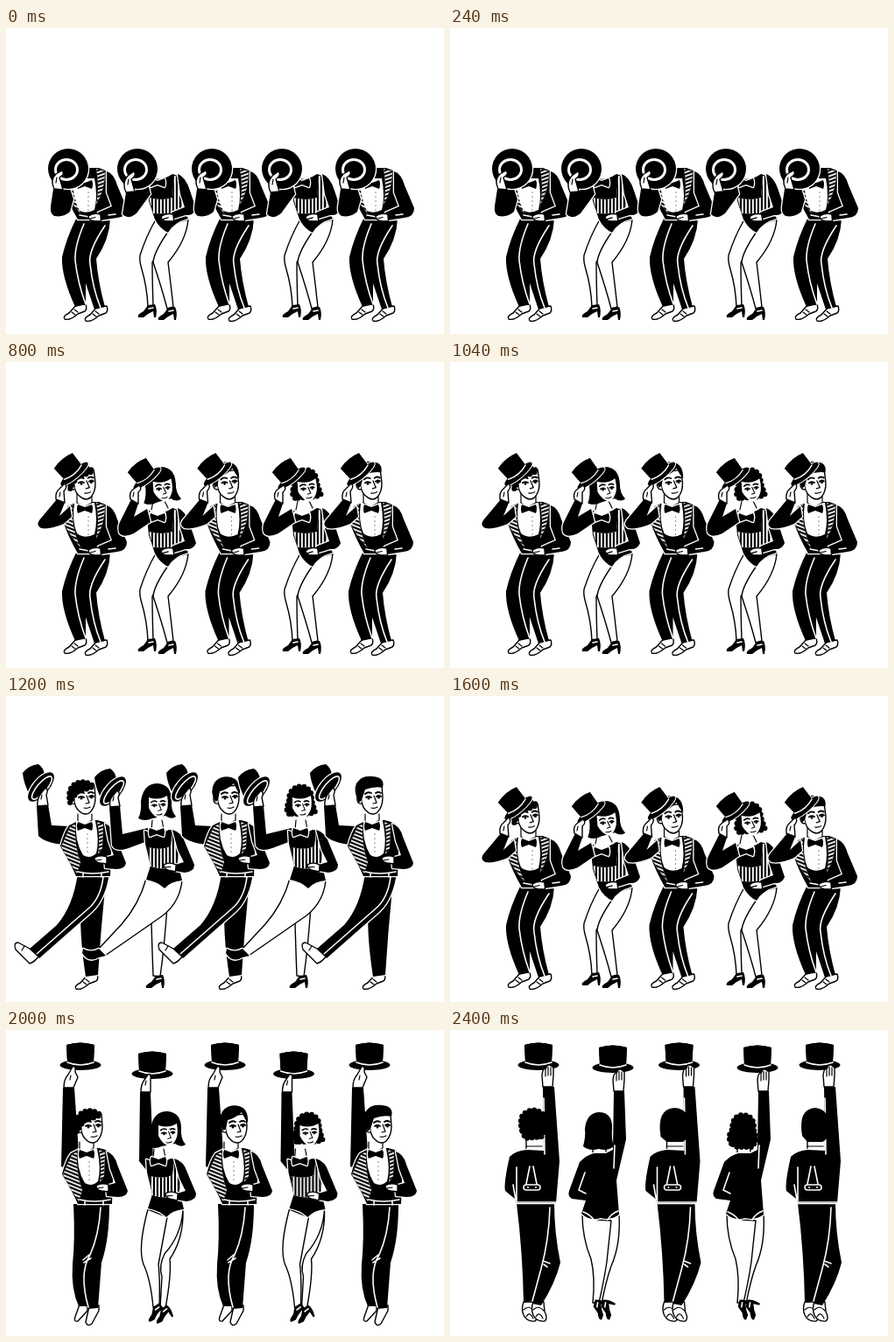
Write an HTML page that moves like this. It is 500 by 350 pixels and loops after 2800 ms.

```html
<!DOCTYPE html>
<html lang="en">
<head>
<meta charset="utf-8">
<title>Chorus line</title>
<style>
html, body { margin: 0; width: 100%; height: 100%; overflow: hidden; background: #fff; }
svg { display: block; width: 100vw; height: 100vh; }
.ink { fill: #000; stroke: #fff; stroke-width: 2.6; paint-order: stroke; stroke-linejoin: round; }
.skin { fill: #fff; stroke: #000; stroke-width: 1.4; stroke-linejoin: round; }
.chalk { fill: none; stroke: #fff; stroke-width: 1.6; stroke-linecap: round; }
.pen { fill: none; stroke: #000; stroke-width: 1.2; stroke-linecap: round; }
.brow { fill: none; stroke: #000; stroke-width: 1.9; stroke-linecap: round; }
.curls { fill: #000; stroke: #000; stroke-width: 6; stroke-linecap: round; stroke-dasharray: 0 5.5; }
</style>
</head>
<body>
<svg id="stage" viewBox="0 0 500 350"></svg>
<script>
const path = cls => d => `<path class="${cls}" d="${d}"/>`;
const [ink, skin, chalk, pen, brow, curls] = ["ink", "skin", "chalk", "pen", "brow", "curls"].map(path);
const fill = (d, paint = "#000") => `<path d="${d}" fill="${paint}"/>`;
const at = (x, y, art, turn = 0, size = 1) =>
  `<g transform="translate(${x} ${y}) rotate(${turn}) scale(${size})">${art}</g>`;
const striped = (d, kind) => fill(d, "#fff") + fill(d, `url(#${kind})`);
const stripes = (id, turn) =>
  `<pattern id="${id}" width="3.8" height="4" patternUnits="userSpaceOnUse" patternTransform="rotate(${turn})"><rect width="4" height="2.2"/></pattern>`;
const ellipse = (cls, x, y, rx, ry, turn = 0) =>
  `<ellipse class="${cls}" rx="${rx}" ry="${ry}" transform="translate(${x} ${y}) rotate(${turn})"/>`;
const buttons = (x, top, bottom) => `<path class="pen" d="M${x} ${top}V${bottom}" stroke-dasharray="0 5"/>`;

// Small parts, each drawn around its own anchor.
const bow = (x, y) => at(x, y, ink("M0-2L-8-5Q-10 0-8 5L0 2 8 5Q10 0 8-5Z"));
const hand = (x, y, turn = 0) => at(x, y, skin("M0-2Q-8-5-14-1Q-14 4-8 5L0 6Z") + pen("M-12 2L-6 1"), turn);
const crown = "M-16-23Q0-28 16-23L15-3Q0 2-15-3Z";
const hat = (x, y, turn, size) => at(x, y,
  ink(crown) + ellipse("ink", 0, 0, 23.5, 6) + fill(crown) + chalk("M-15-3Q0 3 15-3"), turn, size);
const openHat = (x, y) => at(x, y,
  ink("M-21-16Q-14-25-3-26Q3-22 4-14L-13 9Q-20-4-21-16Z") +
  ellipse("ink", 0, 0, 20.5, 9, -50) + ellipse("chalk", 1, 1, 16.5, 5.5, -50));
const hatTop = (x, y) =>
  ellipse("ink", x, y, 23, 23) +
  `<ellipse cx="${x - 2}" cy="${y + 1}" rx="12.5" ry="11.5" fill="none" stroke="#fff" stroke-width="3"/>`;
const shoe = (x, y, turn) => at(x, y, skin("M-5-1L6-2Q8 3 5 6L-3 9Q-12 17-18 15Q-21 12-13 8Z") + pen("M-10 7L-6 10M-7 4L-3 7"), turn);
const heel = (x, y, turn) => at(x, y, fill("M-4-1L4-2Q7 4 5 13L3 13 2 6Q-5 9-9 13L-15 13Q-17 10-9 6Z") + chalk("M-3 3L2 2"), turn);

const features =
  brow("M-7-5Q-4-8 0-6M5-6Q8-8 11-6M-6-1Q-3-3 0-1M6-2Q9-4 11-2") + pen("M3-3L6 5 2 6M0 11Q4 12 7 10") +
  `<circle cx="-3" r="1.5"/><circle cx="8.5" cy="-1" r="1.5"/>`;
const manFace = skin("M-12-13Q-13 8-6 14Q1 21 7 16Q13 10 13-1L12-15Z") + skin("M-12-1Q-17-4-16 2Q-15 7-11 6");
const manHair = {
  curly: curls("M-16 5Q-19-9-12-15Q-2-23 11-14Q5-10-7-9L-12-1Z"),
  part: fill("M-14 4Q-21-8-15-18Q-8-27 4-24Q15-21 14-5Q10-10 7-17Q-2-9-9-8L-11 2Z"),
  quiff: fill("M-14 5Q-21-8-17-17Q-11-27 2-25Q16-24 13-12Q4-14-7-10L-11 2Z")
};
const womanHair = {
  bob: fill("M-21 18Q-17 10-18-2Q-15-22 1-22Q17-21 17-2Q16 9 22 16Q17 20 10 15L-5 18Q-14 22-21 18Z"),
  wavy: curls("M-13 13Q-18 8-13-1Q-14-17 1-19Q14-17 13-3L17 11 10 13Z")
};
const womanFace = fill("M-9-6Q2-2 12-8Q14 4 11 10Q7 18 3 18Q-5 15-9 6Z", "#fff") + at(0, 4, features, 0, 0.88);
const head = (hair, x, y, turn) => at(x, y, manHair[hair]
  ? manFace + features + manHair[hair]
  : womanHair[hair] + womanFace, turn);

// Upper bodies
const manUpright =
  ink("M72 142L84 136H104Q117 138 121 146L119 200H80Q74 186 62 166Q66 150 72 142Z") +
  fill("M82 130L98 130 102 137Q107 160 103 174Q96 181 88 176Q78 160 80 137Z", "#fff") +
  striped("M73 144L79 140Q78 166 85 184L81 197Q71 183 63 166Z", "lapelLeft") +
  striped("M104 138L111 141 110 168 105 175Q108 156 104 138Z", "lapelRight") +
  pen("M82 129V137L90 142 98 136V129") + bow(90, 143) + buttons(93, 152, 174) +
  ink("M113 140Q122 143 125 155L137 185Q136 192 126 192L113 191 112 179 123 176 117 160Z") +
  chalk("M82 195Q98 199 117 195M88 196V201M109 196V201") + hand(115, 180);

const manCrouch = drop =>
  ink("M70 165L82 160H106L121 166 120 219H82Q71 200 65 182Z") +
  at(0, drop, fill("M78 161H101Q105 182 101 197Q90 203 81 196Q75 182 78 161Z", "#fff")) +
  striped("M69 167L76 163Q74 190 85 212Q72 198 65 182Z", "lapelLeft") +
  striped("M103 161L113 164Q113 185 103 202Q107 182 103 161Z", "lapelRight") +
  at(2, drop, bow(88, 168) + buttons(92, 177, 198)) +
  ink("M115 164Q123 166 127 180L138 206Q138 216 127 217L108 220 105 211 121 204 115 188Z") +
  chalk("M84 214L100 217M117 214L125 213") + hand(108, 215, -5);

const womanTop =
  ink("M158 150Q172 156 186 149L194 150Q199 165 196 186L201 207Q188 208 181 216Q172 208 160 206L165 190 159 165Z") +
  striped("M162 169Q178 173 188 168L190 151 194 151Q199 167 195 192Q180 196 165 191Z", "corset") +
  fill("M167 136H178L180 149 173 154 165 149Z", "#fff") + pen("M167 138L166 149M178 138L180 148") + bow(172, 152) +
  ink("M190 149Q201 152 205 165L215 189Q215 197 204 198L192 196 193 189 203 186 196 172Z") +
  hand(194, 191, 5);

const womanCrouch =
  ink("M160 168Q174 178 190 167L199 170 201 205 208 218Q192 222 185 234Q176 230 170 219L163 198Z") +
  striped("M163 194Q178 198 190 194L192 169 199 170 201 211Q185 213 168 212Z", "corset") +
  bow(173, 177) +
  ink("M196 167Q205 170 210 186L217 207Q214 215 205 214L192 218 189 211 204 205 199 190Z") +
  hand(191, 215, -8);

// Lower bodies
const manBentLegs =
  shoe(85, 318) + shoe(109, 320) +
  fill("M81 216L119 218Q118 242 103 264Q105 290 113 319L101 322 91 292 91 316 79 319Q63 284 64 262Q69 240 81 216Z") +
  chalk("M89 224Q78 250 79 266Q82 292 91 316M113 226Q93 256 96 270Q99 298 108 320");
const womanBentLegs =
  skin("M171 219Q160 238 153 260Q152 266 155 276Q161 296 162 319L168 318Q167 290 167 268Q184 246 184 234Z") +
  skin("M185 233Q169 256 168 268Q178 298 184 321L191 319Q188 292 185 268Q206 243 208 219Q192 222 185 234Z") +
  heel(166, 318) + heel(189, 321);

const manKickLegs = low => low
  ? shoe(98, 320) + ink("M86 235L113 220Q108 270 105 319L91 321Q83 270 86 235Z") +
    ink("M82 202H118Q114 232 98 247L38 300 27 289 58 262Q77 240 82 202Z") +
    chalk("M111 207Q108 232 93 244L35 295") +
    skin("M27 289L14 282Q8 282 11 290L27 306Q33 304 37 298Z") + pen("M21 286L18 291")
  : shoe(107, 322) + ink("M86 235L117 215Q112 270 113 321L99 323Q91 280 86 235Z") +
    ink("M79 197H118Q117 225 96 246L30 300 20 287 53 252Q74 232 79 197Z") +
    chalk("M102 204Q98 232 78 250L28 291M112 204Q107 265 109 320") +
    skin("M20 287L10 277Q4 279 8 288L18 303Q24 303 29 298Z") + pen("M15 283L11 287");

const womanKickLegs = low => low
  ? skin("M165 214Q166 270 168 320L176 321Q181 285 184 240L186 212Z") + heel(175, 321) +
    skin("M160 209Q152 238 132 261L106 289 113 297Q145 275 172 256Q198 240 201 211Q188 212 181 220Q172 212 160 209Z") +
    ink("M106 289L114 297 106 299Q94 306 87 294L88 289Q97 294 106 289Z")
  : skin("M178 214Q177 265 184 322L192 322Q193 280 201 207Z") + heel(191, 322) +
    skin("M160 205Q150 235 125 258L98 285 105 293Q138 268 165 250Q180 236 181 215Q172 208 160 205Z") +
    ink("M98 284L106 293 98 296Q88 301 81 290L82 286Q92 290 98 284Z");

const manCrossedLegs =
  skin("M84 314L79 328Q77 334 82 333L93 321V314Z") + skin("M95 316L91 334Q93 340 98 336L106 321V315Z") +
  fill("M77 199H118Q118 240 109 266L105 318 94 319 92 316 83 316Q74 296 76 268Q79 240 77 199Z") +
  chalk("M108 203Q106 235 96 257Q83 278 94 317M95 257L88 263M97 261L89 266");
const womanCrossedLegs =
  skin("M162 205Q150 250 157 268Q165 285 168 317L175 317Q176 285 174 268L184 214Z") +
  skin("M202 206Q200 235 181 256Q174 270 178 282L176 318 182 318Q189 280 187 262Q203 238 202 206Z") +
  heel(172, 316, -25) + heel(181, 318, -25);

// Poses: each returns one dancer at the left end of the line.
const bowMan = () => manBentLegs + manCrouch(11) +
  ink("M54 184L65 185 68 168 77 196 73 210Q66 217 55 215Q50 212 51 204Z") + hatTop(71, 161) +
  skin("M55 184Q50 174 57 167L64 163Q68 167 61 171L65 185Z") + pen("M58 171L57 177");
const bowWoman = () => womanBentLegs + womanCrouch +
  ink("M137 188L147 187 160 170 165 190 149 212Q139 220 133 213Z") + hatTop(150, 161) +
  skin("M137 188Q132 177 139 169L146 164Q150 168 143 173L147 187Z") + pen("M140 173L139 179");

const tipMan = hair => manBentLegs + manCrouch(0) +
  fill("M81 152H98V163L90 169 80 164Z", "#fff") + pen("M81 150V161L89 166 98 161V150") + bow(90, 168) +
  ink("M58 157L67 161 61 176 73 165 75 177 66 185Q50 192 40 190Q34 187 38 181Z") +
  head(hair, 89, 139, -3) + hat(78, 128, -40, 0.85) +
  skin("M57 157Q56 149 61 145L67 139Q71 142 66 148L67 161Z") + pen("M62 149L61 154");
const tipWoman = hair => womanBentLegs + womanCrouch +
  fill("M168 158H181L185 168 174 177 166 170Z", "#fff") + pen("M168 159L166 169M181 159L185 167") + bow(173, 178) +
  ink("M143 157L151 162 146 177 161 168 165 183 146 196Q133 202 129 195Q127 188 131 181Z") +
  head(hair, 177, 142, -4) + hat(161, 133, -38, 0.82) +
  skin("M142 157Q140 149 146 145L152 141Q156 145 151 149L151 162Z") + pen("M146 149L145 154");

const kickMan = low => hair => manKickLegs(low) + at(0, low ? 6 : 0,
  ink("M35 120L48 118 52 142 73 143 66 164Q45 162 37 154Z") + manUpright + head(hair, 89, 111) +
  openHat(40, 98) + skin("M36 120Q35 111 41 104L45 99Q49 101 46 107L48 119Z") + pen("M41 107L40 112"));
const kickWoman = low => hair => womanKickLegs(low) + at(0, low ? 4 : 0,
  ink("M118 123L130 121 133 154 162 147 164 161 140 170Q125 175 121 167Z") + womanTop + head(hair, 172, 118) +
  openHat(122, 105) + skin("M119 123Q117 114 123 109L127 104Q131 107 128 112L130 122Z") + pen("M123 111L122 116"));

const reachMan = hair => manCrossedLegs +
  ink("M65 66L78 66 83 140 77 162 63 156Z") + at(2, -1, manUpright) + head(hair, 97, 111) +
  hat(85, 40) + skin("M66 66Q66 56 71 51L76 42Q80 40 79 48L82 54 77 66Z") + pen("M74 52L73 57");
const reachWoman = hair => womanCrossedLegs +
  ink("M153 71L165 71 168 148 160 160 152 150Z") + at(2, -2, womanTop) + head(hair, 183, 115) +
  hat(167, 50) + skin("M154 71Q154 62 158 57L162 51Q166 49 165 57L165 71Z") + pen("M160 58L159 63");

const raisedPalm = (x, y) => at(x, y,
  skin("M-6 0L-7-13Q-6-22-3-20L-1-25 2-25 6-22 6-13 5 0Z") + pen("M-3-19V-12M0-23V-13M3-22V-13"));
const backShoe = x => at(x, 311,
  skin("M-6 0Q-9 8-6 15Q-2 23 7 22Q11 19 7 11L6 0Z") + pen("M-6 9Q0 3 6 10M-3 17Q1 10 5 19"));
const backHair = {
  curly: curls("M82 115Q78 98 87 94Q97 88 106 96Q112 107 105 122L86 124Z"),
  part: fill("M80 122Q75 90 96 89Q117 90 111 121Q108 127 105 128H87Z"),
  quiff: fill("M81 121Q76 90 96 89Q116 91 111 121Q107 127 104 128H87Z"),
  bob: fill("M152 133Q155 122 154 113Q156 94 171 94Q186 95 185 113Q184 124 187 133Q180 139 170 136Q159 139 152 133Z"),
  wavy: curls("M156 130Q151 122 157 114Q157 97 170 97Q183 98 182 114L185 126 180 134H163Z")
};
const backMan = hair => backShoe(90) + backShoe(101) +
  fill("M76 198H119Q119 232 126 266Q120 290 104 315L94 313 93 310 84 312Q83 255 76 198Z") +
  chalk("M114 203Q113 240 104 273L94 310M106 264L114 267M107 268L111 271") +
  skin("M87 124V138H107V124Z") + pen("M87 133H107") +
  ink("M106 65L119 65 125 150 121 198H76L74 193 63 184Q61 176 68 145Q75 138 87 137L107 138Z") +
  chalk("M107 78L108 142M72 177L75 194M76 157V197M76 197H121M91 156L87 176M95 156L99 176") +
  `<rect x="84" y="177" width="19" height="6" rx="3" fill="#000" stroke="#fff" stroke-width="1.5"/><circle cx="89" cy="180" r="1" fill="#fff"/><circle cx="98" cy="180" r="1" fill="#fff"/>` +
  backHair[hair] + hat(101, 40) + raisedPalm(112, 65);
const backWoman = hair =>
  skin("M193 211Q195 245 184 270Q178 287 173 313L166 313Q167 285 170 263L174 217Z") +
  skin("M151 211Q151 238 161 262Q166 283 163 312L170 312Q176 286 179 265L184 218 169 217Z") +
  heel(166, 313, -70) + heel(175, 313, -70) +
  skin("M163 132V144H178V132Z") +
  ink("M187 70L199 70 201 125 190 172 193 211Q184 218 172 215Q160 219 150 210L155 195 139 193Q134 190 136 184L148 151Q156 143 164 141H178L186 137Z") +
  chalk("M154 163L147 183 155 187M188 132L187 158M152 208Q160 211 164 217M192 207Q184 210 180 217") +
  backHair[hair] + hat(186, 43) + raisedPalm(193, 70);

// Distance from the first man to the other two, and from one woman to the other.
const line = (man, woman, menStep, womenStep) =>
  at(0, 0, man("curly")) + at(0, 0, woman("bob")) + at(menStep, 0, man("part")) +
  at(womenStep, 0, woman("wavy")) + at(2 * menStep, 0, man("quiff"));

const poses = {
  bow: line(bowMan, bowWoman, 164, 165),
  kickHigh: line(kickMan(false), kickWoman(false), 163.5, 163),
  tip: line(tipMan, tipWoman, 163.5, 165),
  kickLow: line(kickMan(true), kickWoman(true), 164, 164),
  reach: line(reachMan, reachWoman, 165, 161.5),
  back: line(backMan, backWoman, 160.5, 165)
};
const steps = ["bow", "kickHigh", "tip", "kickLow", "tip", "reach", "back"];
const stepTime = 400;

const stage = document.getElementById("stage");
stage.innerHTML =
  `<defs>${stripes("lapelLeft", 22)}${stripes("lapelRight", -20)}${stripes("corset", 90)}</defs>` +
  Object.entries(poses).map(([name, art]) => `<g id="${name}" display="none">${art}</g>`).join("");

const start = performance.now();
let shown = null;
function draw() {
  const step = Math.floor((performance.now() - start) / stepTime) % steps.length;
  const next = document.getElementById(steps[step]);
  if (next !== shown) {
    if (shown) shown.setAttribute("display", "none");
    next.removeAttribute("display");
    shown = next;
  }
  requestAnimationFrame(draw);
}
draw();
</script>
</body>
</html>
```
